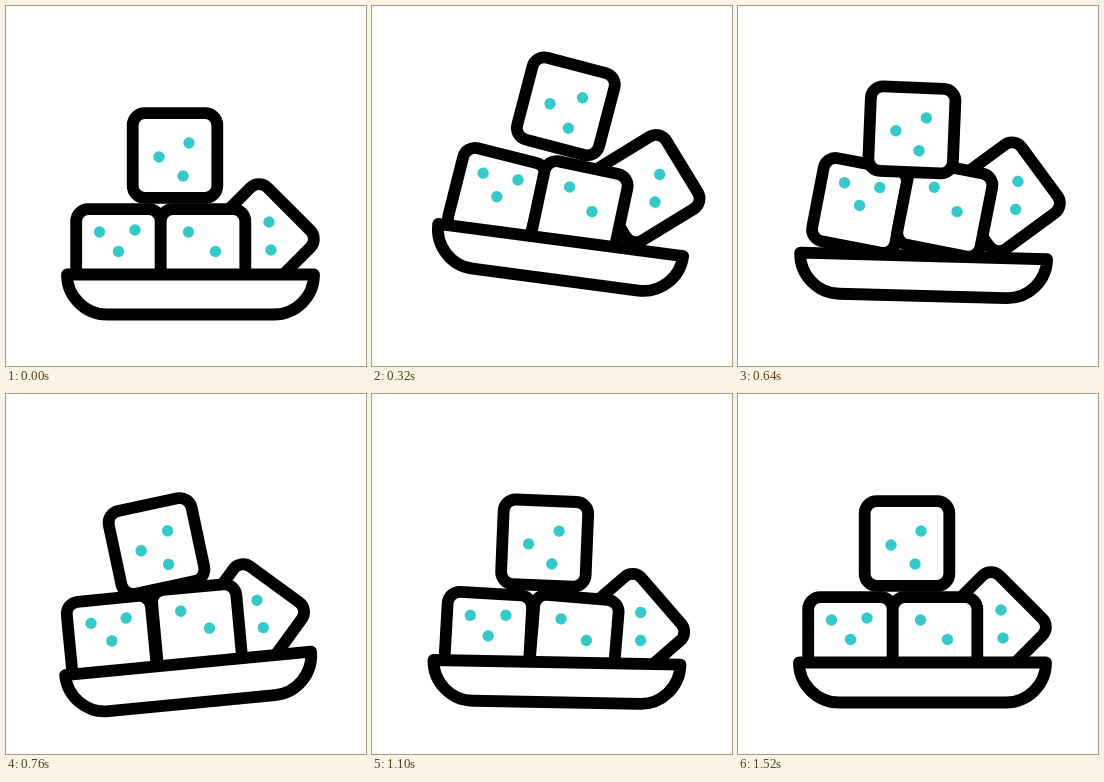
Animation, 360 px wide and 360 px high, one loop 1.82 s. Source, as an HTML page:

```html
<!DOCTYPE html>
<html lang="en">
<head>
<meta charset="utf-8">
<title>Sugar cubes</title>
<style>
  html, body { margin: 0; width: 100%; height: 100%; overflow: hidden; background: #fff; }
  svg { display: block; width: 100vw; height: 100vh; }
  .line { fill: #fff; stroke: #000; stroke-width: 11.8; stroke-linejoin: round; }
</style>
</head>
<body>
<svg id="stage" viewBox="0 0 360 360"></svg>
<script>
const LOOP = 1820, STEP = 20;
const TOP = 500, DROP = 530, LAND = 760, SETTLED = 1520, HALF_SWING = 250;
const SIZE = 84.6;

// lift: offset and angle at the top of the jump; sway: the same for the first swing after landing.
// late: how many ms a part trails behind the tray.
const PARTS = [
  { at: [253, 233], tilt: 45, late: 40, lift: [22, -53, 14.3], sway: [-12, -4.5, -11], dots: [[10, -17], [12, 11]] },
  { at: [112.5, 245.5], late: 48, lift: [13, -58, 15], sway: [-9.2, 9, -8.1], dots: [[-19, -19.5], [16.5, -21.5], [0, 0]] },
  { at: [197, 245.5], late: 70, lift: [11.6, -46, 13], sway: [-11, 0, -10.5], dots: [[-14.5, -19.5], [12.5, 0]] },
  { at: [169, 149.5], late: 0, lift: [25.4, -50.3, 15], sway: [-18.5, 2.5, -12], dots: [[14, -12.5], [-16, 1.5], [8, 20.5]] },
  { at: [184.5, 288.5], late: 0, lift: [1.6, -35.5, 7.7], sway: [-0.5, 0.8, -5.5], dots: [],
    path: "M-123.5-20H123.5C123.5 2 105.5 20 83.5 20H-83.5C-105.5 20-123.5 2-123.5-20Z" }
];

const clamp = x => Math.min(1, Math.max(0, x));
const smooth = x => x * x * (3 - 2 * x);

function add(parent, tag, attrs = {}) {
  const el = document.createElementNS("http://www.w3.org/2000/svg", tag);
  for (const key in attrs) el.setAttribute(key, attrs[key]);
  return parent.appendChild(el);
}

const pile = add(document.getElementById("stage"), "g");
for (const part of PARTS) {
  part.el = add(pile, "g");
  if (part.path) {
    add(part.el, "path", { class: "line", d: part.path });
  } else {
    add(part.el, "rect", {
      class: "line", x: -SIZE / 2, y: -SIZE / 2, width: SIZE, height: SIZE, rx: 12,
      transform: `rotate(${part.tilt || 0})`
    });
  }
  for (const [cx, cy] of part.dots) add(part.el, "circle", { cx, cy, r: 5.7 });
}

// Quick rise, smooth fall, then a fading pendulum swing.
function pose({ late, lift, sway }, t) {
  const own = t - late;
  const rise = 1 - (1 - clamp(own / TOP)) ** 3.7;
  const fall = smooth(clamp((own - DROP) / (LAND - DROP)));
  const fade = clamp((SETTLED - t) / (SETTLED - LAND)) ** 1.3;
  const swing = fade * Math.cos(Math.PI * Math.max(0, own - LAND) / HALF_SWING);
  return lift.map((v, i) => v * rise * (1 - fall) + sway[i] * fall * swing);
}

// The dots turn pale for a moment during the second swing.
function dotColor(t) {
  const pale = clamp(1 - Math.abs(t - 960) / 80);
  const mix = (a, b) => Math.round(a + (b - a) * pale);
  return `rgb(${mix(53, 166)},${mix(201, 204)},${mix(202, 208)})`;
}

function draw(time) {
  const t = Math.floor((time % LOOP) / STEP) * STEP;
  pile.setAttribute("fill", dotColor(t));
  for (const part of PARTS) {
    const [x, y, angle] = pose(part, t);
    part.el.setAttribute("transform", `translate(${part.at[0] + x} ${part.at[1] + y}) rotate(${angle})`);
  }
}

const start = performance.now();
function tick() {
  draw(performance.now() - start);
  requestAnimationFrame(tick);
}
tick();
</script>
</body>
</html>
```
